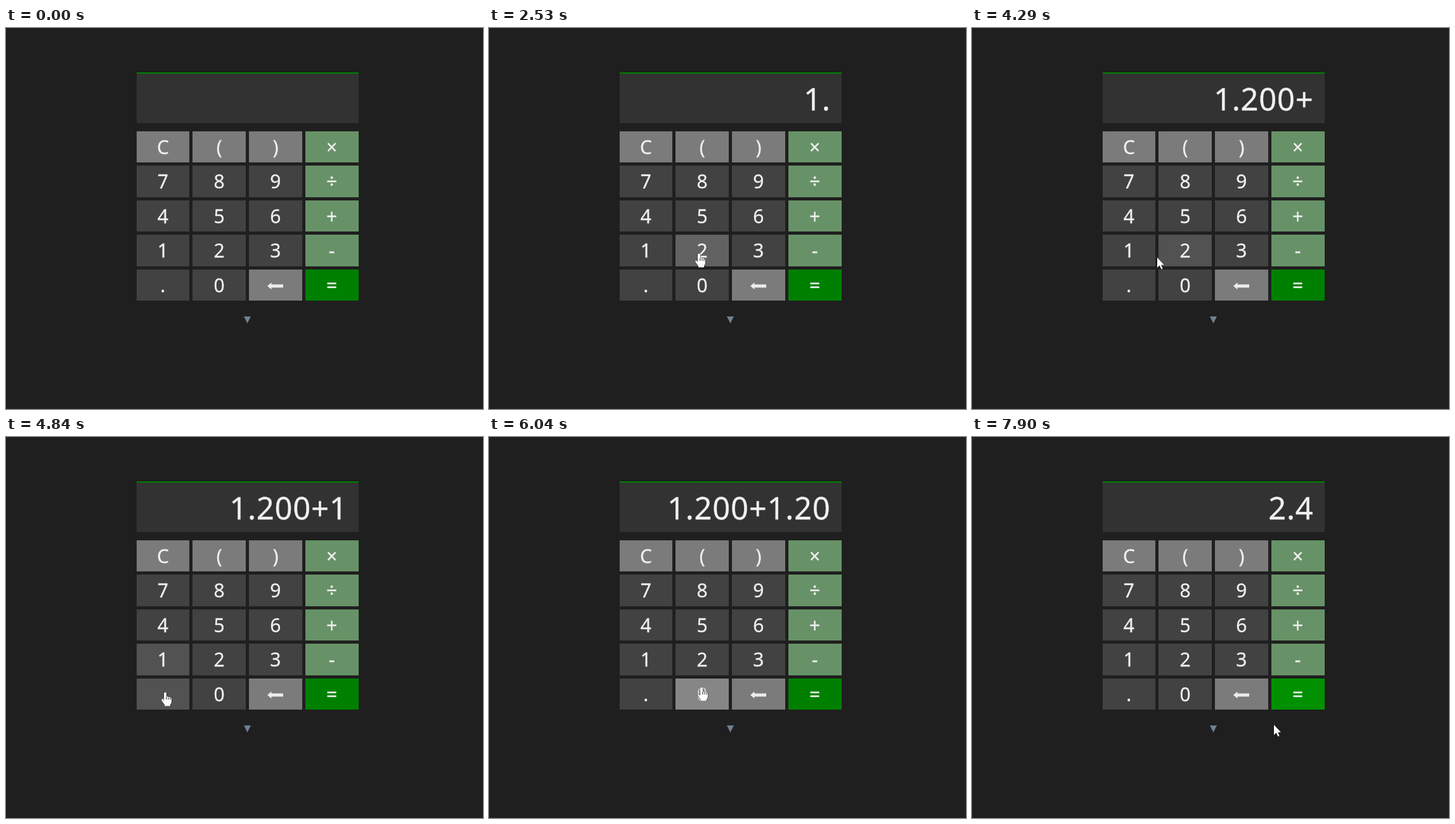
Animation of 752 by 601 pixels, one loop 8000 ms. Source, as an HTML page:

```html
<!DOCTYPE html>
<html lang="en">
<head>
<meta charset="utf-8">
<title>Calculator</title>
<style>
html, body { margin: 0; width: 100%; height: 100%; overflow: hidden; background: #1f1f1f; }
body {
  position: relative; font-family: "Noto Sans", "Open Sans", sans-serif;
  color: #f0f0f0; -webkit-text-stroke: 0.3px;
}
#display {
  position: absolute; left: 205.5px; top: 70px; width: 350px; height: 80px;
  box-sizing: border-box; padding-right: 17px; border-top: 2px solid #008000;
  background: #323232; font-size: 49px; line-height: 79px; letter-spacing: 0.7px;
  text-align: right; white-space: nowrap;
}
.key {
  position: absolute; width: 83.75px; height: 49.5px;
  font-size: 30px; line-height: 49.5px; text-align: center;
}
svg { position: absolute; left: 0; top: 0; }
</style>
</head>
<body>
<div id="display"></div>
<svg id="overlay" width="752" height="601" viewBox="0 0 752 601">
  <path fill="#708090" d="M375 455H386L380.5 466Z"/>
  <path fill="#ececec" d="M412 407L418.5 401.5V404.5H437V409.5H418.5V412.5Z"/>
  <g id="cursor" fill="#fff" stroke="#111" stroke-linejoin="round" paint-order="stroke">
    <path id="arrow" d="M0 0V16L3.7 12.6 6.4 18.6 8.7 17.5 6.1 11.7H11Z"/>
    <g id="hand">
      <path d="M-1.9 2Q-1.9 .5 0 .5T1.9 2V8.5Q1.9 7 3.4 7.2 5 7.4 5 9 5.2 7.8 6.6 8 8 8.3 8 10 8.3 9 9.2 9.3 10 9.8 10 11.5V15Q10 18 8 20V22.5H-1V20.5L-5.5 14Q-6.5 12-5 11.5-4 11.2-1.9 14Z"/>
      <path fill="none" d="M1.9 8V12M5 9V12M8 10V12.5"/>
    </g>
  </g>
</svg>
<script>
const LOOP = 8000, LAST_STEP = 73;
const GRID = { x: 205.5, y: 162.9, dx: 88.75, dy: 54.5, w: 83.75, h: 49.5 };
const LABELS = 'C()×789÷456+123-.0←=';

// Grey levels or colours at rest, hovered and pressed.
const grey = v => [v, v, v];
const DIGIT = [66, 98, 189].map(grey);
const EXTRA = [123, 149, 200].map(grey);
const OPERATOR = [[103, 146, 103], [128, 165, 128], [128, 165, 128]];
const EQUALS = [[0, 128, 0], [0, 160, 0], [0, 160, 0]];
const LIGHT = grey(240), DIM = grey(130);

// The pointer reaches each stop on its step, presses the key there and leaves later.
const stop = (key, x, y, step, stay = 1) => ({ key, x, y, step, leave: step + stay });
const STOPS = [
  stop('', 656, 538, 1, 0),
  stop('', 368, 432, 9, 0),
  stop('1', 263, 375.5, 14, 2),
  stop('.', 258, 400, 20),
  stop('2', 332, 354, 25),
  stop('0', 326, 405, 28),
  stop('0', 326, 405, 30, 2),
  stop('+', 505, 302, 37, 0),
  stop('1', 277, 366, 42),
  stop('.', 250, 403, 46),
  stop('2', 337, 348, 51),
  stop('0', 335, 394, 55, 2),
  stop('', 410, 432, 59, 0),
  stop('=', 496, 424, 61, 10),
  stop('', 476, 454, LAST_STEP, 0)
];
const PRESSES = STOPS.filter(s => s.key);
const SELECT_FROM = 30, SELECT_TO = 38;

const $ = id => document.getElementById(id);
const mix = (a, b, k) => a.map((v, i) => v + (b[i] - v) * k);
const rgb = c => `rgb(${c.map(Math.round)})`;
const easeOut = k => 1 - (1 - k) ** 3;

const keys = [...LABELS].map((label, i) => {
  const el = document.createElement('div');
  const text = document.createElement('span');
  const col = i % 4, row = i >> 2;
  el.className = 'key';
  el.style.left = GRID.x + col * GRID.dx + 'px';
  el.style.top = GRID.y + row * GRID.dy + 'px';
  text.textContent = label === '←' ? '' : label; // drawn in the overlay
  el.append(text);
  document.body.insertBefore(el, $('overlay'));
  const colors = label === '=' ? EQUALS : col === 3 ? OPERATOR
    : 'C()←'.includes(label) ? EXTRA : DIGIT;
  return { el, text, label, colors };
});

function pointerAt(step) {
  const from = STOPS.findLast(s => s.step <= step) || STOPS[0];
  const to = STOPS[STOPS.indexOf(from) + 1] || from;
  const k = (step - from.leave) / (to.step - from.leave || 1);
  return mix([from.x, from.y], [to.x, to.y], easeOut(Math.max(0, k)));
}

function keyUnder([x, y]) {
  const dx = x - GRID.x, dy = y - GRID.y;
  const col = Math.floor(dx / GRID.dx), row = Math.floor(dy / GRID.dy);
  const inside = col >= 0 && col < 4 && row >= 0 && row < 5 &&
    dx - col * GRID.dx < GRID.w && dy - row * GRID.dy < GRID.h;
  return inside ? row * 4 + col : -1;
}

// Hover levels per step; each key fades over two steps, one step late.
const hover = [keys.map(() => 0)];
for (let step = 1; step <= LAST_STEP; step++) {
  const over = keyUnder(pointerAt(step - 1));
  hover.push(hover[step - 1].map((v, i) =>
    Math.min(1, Math.max(0, v + (i === over ? 0.5 : -0.5)))));
}

function flashLevel(label, step) {
  const last = PRESSES.findLast(p => p.key === label && p.step <= step);
  return last ? Math.max(0, 1 - 0.6 * (step - last.step)) : 0;
}

function draw(step) {
  const typed = PRESSES.filter(p => p.step < step).map(p => p.key).join('');
  $('display').textContent = typed.endsWith('=') ? '2.4' : typed;

  keys.forEach(({ el, text, label, colors }, i) => {
    const flash = flashLevel(label, step);
    const base = mix(colors[0], colors[1], hover[step][i]);
    const selected = label === '0' && step >= SELECT_FROM && step < SELECT_TO;
    const dims = colors === DIGIT && !selected;
    el.style.background = rgb(mix(base, colors[2], flash));
    text.style.color = selected ? '#fff' : rgb(mix(LIGHT, DIM, dims ? flash : 0));
    text.style.background = selected ? '#1769e0' : 'none';
  });

  const tip = pointerAt(step);
  const onKey = keyUnder(tip) >= 0;
  $('cursor').style.display = step ? '' : 'none';
  $('cursor').setAttribute('transform', `translate(${tip.map(Math.round)})`);
  $('hand').style.display = onKey ? '' : 'none';
  $('arrow').style.display = onKey ? 'none' : '';
}

// The picture advances in discrete steps, slightly longer after the first 1.2 s.
const stepAt = t => Math.min(LAST_STEP,
  t < 1200 ? Math.floor(t / 100) : 12 + Math.floor((t - 1200) / 109.8));

let shown = -1;
const start = performance.now();
function tick() {
  const step = stepAt((performance.now() - start) % LOOP);
  if (step !== shown) draw(shown = step);
  requestAnimationFrame(tick);
}
tick();
</script>
</body>
</html>
```
